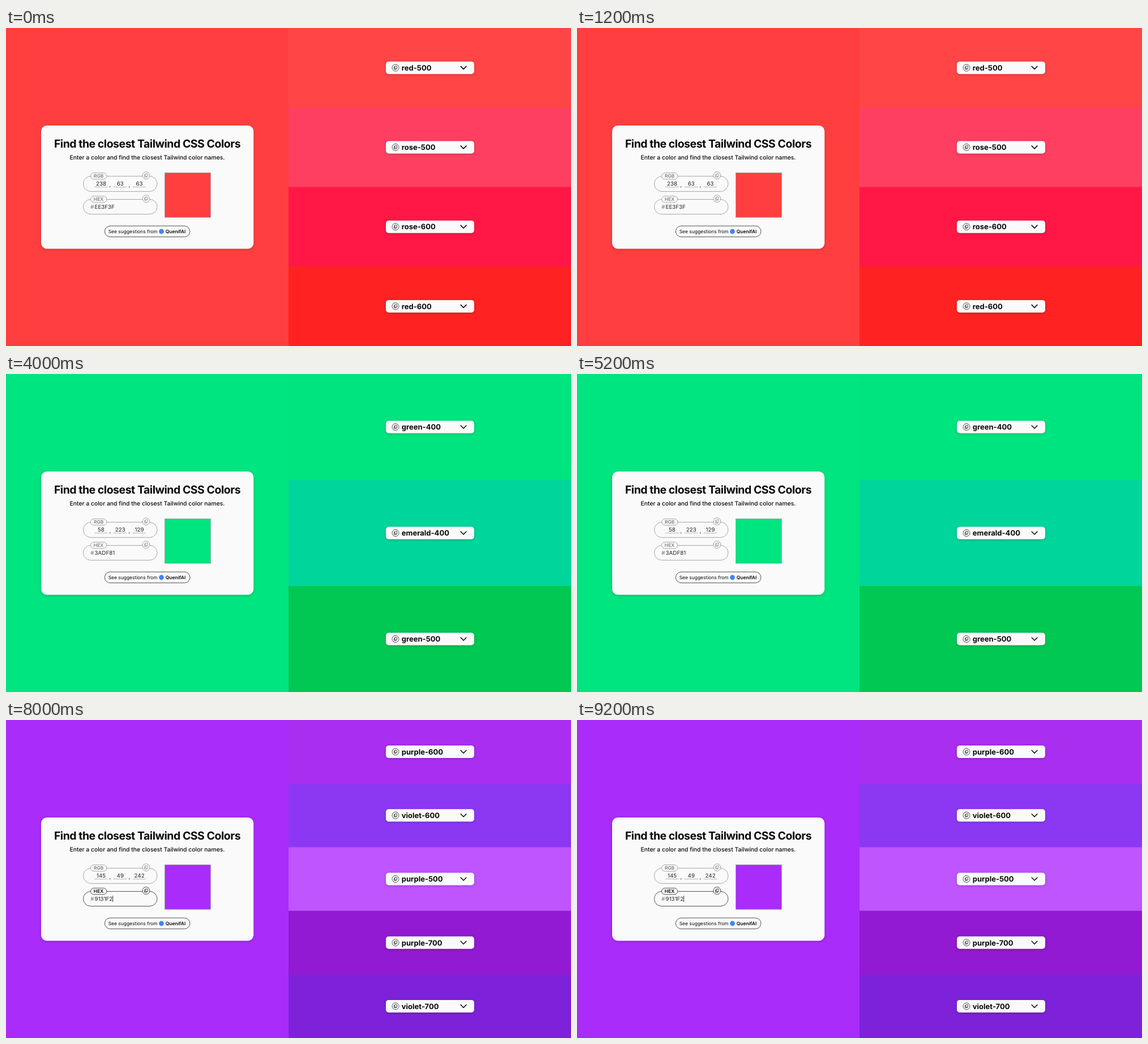
An HTML page that plays this animation: 998 by 561 pixels, repeating every 10 s.

```html
<!DOCTYPE html>
<html lang="en">
<head>
<meta charset="utf-8">
<title>Closest colors</title>
<style>
  html, body { margin: 0; width: 100%; height: 100%; overflow: hidden; }
  svg { display: block; width: 100vw; height: 100vh; font-family: Inter, sans-serif; text-rendering: geometricPrecision; }
  .card { fill: #fafafa; filter: drop-shadow(0 1px 2px rgba(0, 0, 0, .22)); }
  .line { fill: none; stroke: #27272a; stroke-width: .8; }
  .tag { fill: #fafafa; stroke: #27272a; stroke-width: .8; }
  .ink { fill: #09090b; }
  .value { fill: #27272a; font-size: 9.75px; }
  .small { font-size: 8.45px; }
  .mid { text-anchor: middle; }
</style>
</head>
<body>
<svg id="stage" viewBox="0 0 998 561" preserveAspectRatio="none"></svg>
<script>
const STEP = 2000;
const scenes = [
  { color: '#ff3f3f', rgb: [238, 63, 63], hex: 'EE3F3F',
    bands: [['red-500', '#ff4545'], ['rose-500', '#ff3f62'], ['rose-600', '#ff1846'], ['red-600', '#ff2222']] },
  { color: '#ffc000', rgb: [249, 191, 31], hex: 'F9BF1F', open: 1, details: ['250, 204, 21', '#FACC15'],
    bands: [['amber-400', '#ffc000'], ['yellow-400', '#ffce00'], ['yellow-500', '#ffb300']] },
  { color: '#00e57f', rgb: [58, 223, 129], hex: '3ADF81',
    bands: [['green-400', '#00e47f'], ['emerald-400', '#00d59b'], ['green-500', '#00c853']] },
  { color: '#0064f5', rgb: [30, 98, 235], hex: '1E62EB', active: true,
    bands: [['blue-600', '#0064f5'], ['blue-700', '#004cdd'], ['blue-500', '#0084ff']] },
  { color: '#a92cfa', rgb: [145, 49, 242], hex: '9131F2', active: true, caret: true,
    bands: [['purple-600', '#aa2ef0'], ['violet-600', '#8c38f2'], ['purple-500', '#be55ff'],
            ['purple-700', '#911ad2'], ['violet-700', '#7e22da']] }
];

const rect = (x, y, w, h, attrs) => `<rect x="${x}" y="${y}" width="${w}" height="${h}" ${attrs}/>`;
const text = (x, y, content, attrs) => `<text x="${x}" y="${y}" ${attrs}>${content}</text>`;

// Two overlapping sheets inside a ring
const copyIcon = (x, y, r) => `<g transform="translate(${x} ${y}) scale(${r / 6})">
  <circle r="6" class="tag" stroke-width=".9"/>
  <path d="M-1.2 -2.8H2.5V1.5H-1.2ZM-1.2 -1.5H-2.5V2.8H1.2V1.5" class="line" stroke-width=".9"/></g>`;

const field = (y, label, active, height) => `<g opacity="${active ? 1 : .5}">
  ${rect(136.5, y, 130.5, height, `rx="${height / 2}" class="line"`)}
  ${rect(149.5, y - 5.8, 28.3, 11.2, 'rx="5.6" class="tag"')}
  ${text(163.6, y + 2.9, label, 'class="ink small mid" font-weight="600"')}
  </g><circle cx="247.4" cy="${y - 1.3}" r="6.5" fill="#fafafa"/>
  <g opacity="${active ? 1 : .5}">${copyIcon(247.4, y - 1.3, 6.4)}</g>`;

function rgbField(rgb) {
  const parts = rgb.map((n, i) => {
    const x = 168 + i * 33.8;
    return text(x, 278, n, 'class="value mid"')
      + `<path d="M${x - 12} 280.5h23.6" stroke="#a1a1aa" stroke-width=".8"/>`
      + (i < 2 ? text(x + 14.6, 280, ',', 'class="value"') : '');
  });
  return field(261.4, 'RGB', false, 27) + parts.join('');
}

const hexField = s => field(302.4, 'HEX', s.active, 26)
  + text(149.2, 319, '#', 'font-size="9.75" fill="#71717a"')
  + text(156.6, 319, s.hex, 'class="value"')
  + (s.caret ? rect(188.3, 310, .8, 11, 'fill="#09090b"') : '');

const panel = s => rect(62, 172, 375.3, 217.4, 'rx="10" class="card"')
  + text(249.5, 211, 'Find the closest Tailwind CSS Colors',
      'class="ink mid" font-size="19.5" font-weight="700" letter-spacing="-.4875"')
  + text(249.5, 232, 'Enter a color and find the closest Tailwind color names.',
      'class="ink mid" font-size="10.4" font-weight="500"')
  + rgbField(s.rgb) + hexField(s)
  + rect(280.4, 255.3, 81, 78.8, `fill="${s.color}" stroke="#a1a1aa" stroke-width=".8"`)
  + rect(174.4, 349.2, 150.5, 19.3, 'rx="9.65" class="line"')
  + text(180.7, 361.8, 'See suggestions from', 'class="ink small"')
  + '<circle cx="274.5" cy="358.8" r="4.4" fill="#4285f4"/>'
  + text(281.8, 361.8, 'QuenifAI', 'class="ink small" font-weight="600"');

const detail = (y, label, value) => copyIcon(688, y, 5.2)
  + text(697.8, y + 3, `<tspan font-weight="700">${label}:</tspan> ${value}`, 'class="ink small"');

function band([name, color], i, s) {
  const height = 561 / s.bands.length, y = height * (i + .5), open = s.open === i;
  const bend = open ? -2.5 : 2.5;
  return rect(499, height * i, 499, height + (i < s.bands.length - 1 ? 1 : 0), `fill="${color}"`)
    + rect(671, y - 11, 156, 22, 'rx="5" class="card"')
    + copyIcon(688, y, 6)
    + text(698.8, y + 4.8, name, 'class="ink" font-size="13" font-weight="700"')
    + `<path d="M803.2 ${y - bend}l4.9 ${2 * bend} 4.9 ${-2 * bend}" fill="none" stroke="#09090b" stroke-width="1.5" stroke-linecap="round" stroke-linejoin="round"/>`
    + (open ? rect(671, y + 13, 156, 34.5, 'rx="5" class="card"')
      + detail(y + 22.6, 'RGB', s.details[0]) + detail(y + 38.4, 'HEX', s.details[1]) : '');
}

const stage = document.getElementById('stage');
let shown = -1;

function draw(time) {
  const index = Math.floor(time / STEP) % scenes.length;
  if (index !== shown) {
    const s = scenes[shown = index];
    stage.innerHTML = rect(0, 0, 499, 561, `fill="${s.color}"`)
      + s.bands.map((b, i) => band(b, i, s)).join('') + panel(s);
  }
}

const start = performance.now();
function tick() {
  draw(performance.now() - start);
  requestAnimationFrame(tick);
}
tick();
</script>
</body>
</html>
```
